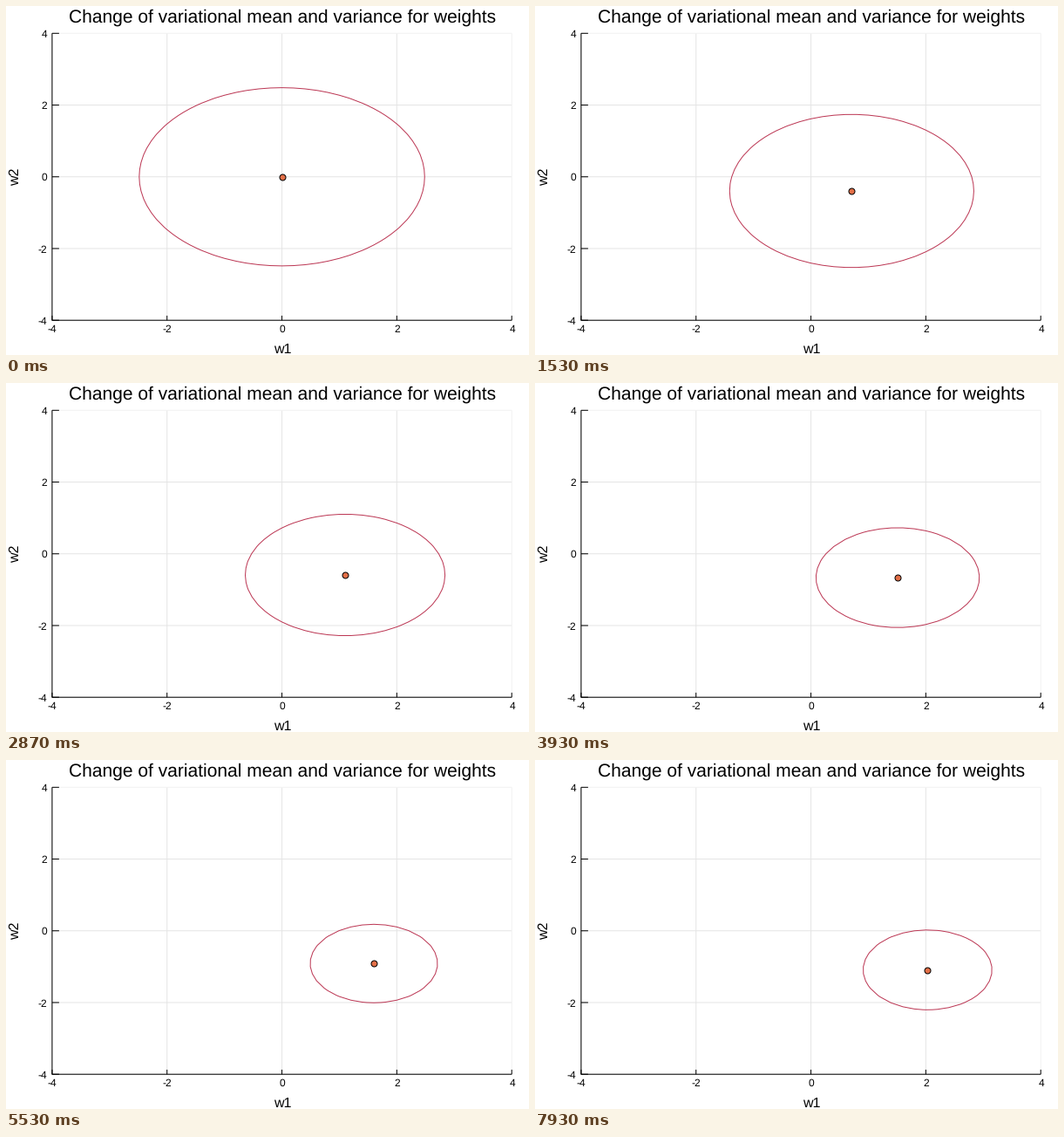
Animation of 600x400 px, one loop 8000 ms. Source, as a matplotlib script:

```python
import numpy as np
import matplotlib.pyplot as plt
from matplotlib.animation import FuncAnimation

W, H, DPI = 600, 400, 100
PX = 72 / DPI                       # one pixel in points
LOOP, TICK, RATE = 8000, 20, 15     # ms, ms, steps per second
LEFT, RIGHT, TOP, BOTTOM = 52.9, 580.2, 31.3, 360.2
UX, UY = (RIGHT - LEFT) / 8, (BOTTOM - TOP) / 8
GRID = np.linspace(-4, 4, 41)       # grid on which the density is contoured

# step, mean of w1 and w2, contour radius along w1 and w2
KEYS = np.array([
    (0, 0, 0, 2.484, 2.484),
    (23, 0.71, -0.395, 2.125, 2.134),
    (43, 1.10, -0.59, 1.738, 1.693),
    (50, 1.42, -0.63, 1.575, 1.55),
    (59, 1.51, -0.665, 1.422, 1.391),
    (83, 1.60, -0.913, 1.109, 1.094),
    (99, 1.865, -0.955, 1.171, 1.174),
    (119, 2.03, -1.09, 1.122, 1.113),
])

plt.rcParams.update({
    "font.family": "Liberation Sans",
    "text.hinting": "none",
    "text.hinting_factor": 1,
})


def to_x(v):
    return LEFT + UX * (v + 4)


def to_y(v):
    return BOTTOM - UY * (v + 4)


def contour(m1, m2, r1, r2):
    """Ellipse with corners where it crosses the density grid."""
    u, v = (GRID - m1) / r1, (GRID - m2) / r2
    a = np.arccos(u[np.abs(u) < 1])
    b = np.arcsin(v[np.abs(v) < 1])
    t = np.sort(np.concatenate([a, -a, b, np.pi - b]) % (2 * np.pi))
    t = np.append(t, t[0])
    return to_x(m1 + r1 * np.cos(t)), to_y(m2 + r2 * np.sin(t))


fig = plt.figure(figsize=(W / DPI, H / DPI), dpi=DPI, facecolor="white")
ax = fig.add_axes([0, 0, 1, 1])
ax.set(xlim=(0, W), ylim=(H, 0))
ax.axis("off")


def line(x, y, color="black", **kw):
    return ax.plot(x, y, color=color, lw=PX, solid_capstyle="butt",
                   snap=False, **kw)[0]


def label(x, y, text, size, **kw):
    kw = {"ha": "center", "va": "baseline", **kw}
    ax.text(x, y, text, fontsize=size * PX, color="black", **kw)


for v in range(-4, 5, 2):
    x, y = to_x(v), to_y(v)
    shade = "#f2f2f2" if v == 4 else "#e5e5e5"
    line([x, x], [TOP, BOTTOM], shade, zorder=1)
    line([LEFT, RIGHT], [y, y], shade, zorder=1)
    line([x, x], [BOTTOM, BOTTOM - 5.3], zorder=2)
    line([LEFT, LEFT + 8], [y, y], zorder=2)
    label(x + 0.4, 374.2, str(v), 12.3)
    label(47.3, y + 4.6, str(v), 12.3, ha="right")
line([LEFT, LEFT, RIGHT], [TOP, BOTTOM, BOTTOM], zorder=2)

label(317.2, 18.5, "Change of variational mean and variance for weights", 21.2)
label(317.6, 398.2, "w1", 16.3)
label(14.6, 195.7, "w2", 16.3, rotation=90, rotation_mode="anchor")

ring = line([], [], "#bc3754", zorder=3)
dot, = ax.plot([], [], "o", ms=7 * PX, mfc="#e36f47", mec="black",
               mew=PX, zorder=4)


def draw(i):
    # step times are rounded to 10 ms, hence the small lead
    step = int((i * TICK + 14) * RATE / 1000)
    m1, m2, r1, r2 = (np.interp(step, KEYS[:, 0], col) for col in KEYS.T[1:])
    ring.set_data(*contour(m1, m2, r1, r2))
    dot.set_data([to_x(m1)], [to_y(m2)])
    return ring, dot


anim = FuncAnimation(fig, draw, frames=LOOP // TICK, interval=TICK,
                     repeat=True, repeat_delay=0)
plt.show()
```
